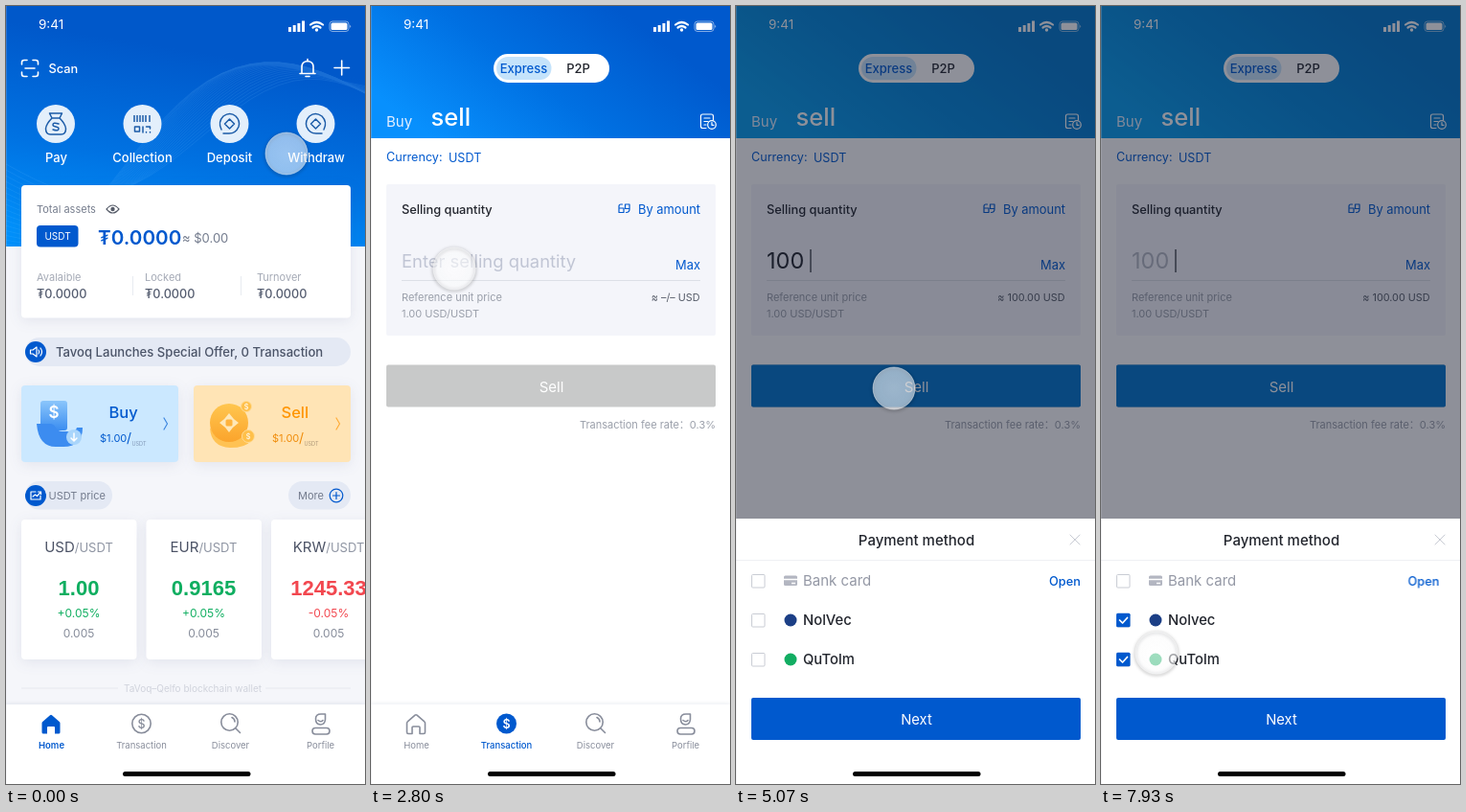
These frames come from a looping animation (375 px wide and 812 px high, 8 s). An HTML page:

```html
<!DOCTYPE html>
<html lang="en">
<head>
<meta charset="utf-8">
<title>Wallet sell flow</title>
<style>
html, body { margin: 0; width: 100%; height: 100%; overflow: hidden; background: #fff; }
svg { display: block; width: 100%; height: 100%; }
text { font-family: Inter, "Noto Sans", "Noto Sans CJK SC", "Noto Sans CJK", sans-serif; white-space: pre; }
.num { font-family: "Liberation Sans", Arial, sans-serif; font-weight: 700; font-size: 22px; }
.mid { text-anchor: middle; }
.end { text-anchor: end; }
.med { font-weight: 500; }
.line { fill: none; stroke-linecap: round; stroke-linejoin: round; }
.card { fill: #fff; filter: drop-shadow(0 3px 7px rgba(40, 60, 110, .09)); }
.anim { animation: 8s linear infinite; }

#sellScreen { animation-name: openSell; }
#placeholder { animation-name: dropHint; }
#caret { animation-name: showCaret; }
#amount, #activeButton, #total { animation-name: enterAmount; }
#emptyTotal { animation-name: clearTotal; }
#amount text { animation-name: mute; }
.tint { fill: #00b8c8; animation-name: tint; }
#dim { animation-name: dim; }
#deepDim { animation-name: deepen; }
#p2p { animation-name: nudge; }
#sheet { animation-name: rise; }
.checkA { animation-name: checkA; }
.uncheckA { animation-name: uncheckA; }
.checkB { animation-name: checkB; }
#open { animation-name: shiftOpen; }
#cursor { animation-name: travel; animation-timing-function: ease-in-out; }

@keyframes openSell { 0%, 17% { opacity: 0; } 20%, 100% { opacity: 1; } }
@keyframes dropHint { 0%, 37.5% { opacity: 1; } 39.5%, 100% { opacity: 0; } }
@keyframes showCaret { 0%, 37.5% { opacity: 0; transform: translateX(-44px); }
  39.5%, 45% { opacity: 1; transform: translateX(-44px); }
  48%, 100% { opacity: 1; transform: none; } }
@keyframes enterAmount { 0%, 45% { opacity: 0; } 48%, 100% { opacity: 1; } }
@keyframes clearTotal { 0%, 45% { opacity: 1; } 48%, 100% { opacity: 0; } }
@keyframes mute { 0%, 65% { fill: #23262e; } 68%, 100% { fill: #b4b8c2; } }
@keyframes tint { 0%, 57.5% { opacity: 0; } 61.5%, 100% { opacity: .3; } }
@keyframes dim { 0%, 57.5% { opacity: 0; } 61.5%, 100% { opacity: .48; } }
@keyframes deepen { 0%, 80% { opacity: 0; } 82%, 84% { opacity: .25; } 86.5%, 100% { opacity: 0; } }
@keyframes nudge { 0%, 80% { transform: none; } 82%, 84% { transform: translateX(-3px); } 86.5%, 100% { transform: none; } }
@keyframes rise { 0%, 57.5% { transform: translateY(278px); animation-timing-function: ease-out; } 61.5%, 100% { transform: none; } }
@keyframes checkA { 0%, 84% { opacity: 0; } 86.5%, 100% { opacity: 1; } }
@keyframes uncheckA { 0%, 84% { opacity: 1; } 86.5%, 100% { opacity: 0; } }
@keyframes checkB { 0%, 94% { opacity: 0; } 96%, 100% { opacity: 1; } }
@keyframes shiftOpen { 0%, 84% { transform: none; } 86.5%, 100% { transform: translateX(-6.5px); } }
@keyframes travel {
  0% { transform: translate(293px, 154px); }
  11%, 20% { transform: translate(264px, 436px); }
  31%, 34% { transform: translate(86px, 274px); }
  35%, 52.5% { transform: translate(87px, 274px); }
  57%, 65.5% { transform: translate(165px, 399px); }
  77%, 87.5% { transform: translate(35px, 642px); }
  92%, 100% { transform: translate(58px, 675px); }
}
</style>
</head>
<body>
<svg viewBox="0 0 375 812" preserveAspectRatio="none">
<defs>
  <linearGradient id="homeBlue" x1=".62" y1="0" x2=".38" y2="1">
    <stop offset=".2" stop-color="#0058ca"/><stop offset=".65" stop-color="#0072e2"/><stop offset="1" stop-color="#0090fa"/>
  </linearGradient>
  <linearGradient id="sellBlue" x1="0" y1=".65" x2=".8" y2=".25">
    <stop offset="0" stop-color="#0890fd"/><stop offset=".5" stop-color="#0070e2"/><stop offset="1" stop-color="#0059cd"/>
  </linearGradient>
  <linearGradient id="azure" x1="0" y1="0" x2="0" y2="1"><stop stop-color="#8bc6fb"/><stop offset="1" stop-color="#3b8df0"/></linearGradient>
  <linearGradient id="amber" x1="0" y1="0" x2="0" y2="1"><stop stop-color="#ffc64f"/><stop offset="1" stop-color="#fba42c"/></linearGradient>
  <radialGradient id="glass"><stop stop-color="#fff" stop-opacity=".6"/><stop offset=".8" stop-color="#fbfbfb" stop-opacity=".58"/><stop offset="1" stop-color="#eff0f2" stop-opacity=".6"/></radialGradient>
  <clipPath id="homeClip"><rect width="375" height="251"/></clipPath>

  <g id="status" fill="#fff">
    <text x="34" y="24" font-size="13.5">9:41</text>
    <path d="M295 22h3v5h-3zM299.7 20h3v7h-3zM304.4 18h3v9h-3zM309 15.500h3V27h-3z"/>
    <g class="line" stroke="#fff" stroke-width="2.200"><path d="M318 19.500q6.500-5 13 0M320.500 22.500q4-3 8 0"/></g>
    <circle cx="324.500" cy="25" r="1.700"/>
    <rect x="338" y="16" width="20" height="10.500" rx="3" fill="none" stroke="#fff" stroke-opacity=".5"/>
    <rect x="339.500" y="17.500" width="17" height="7.500" rx="1.500"/><path d="M359.500 19.500v3.500q1.500-1.700 0-3.500"/>
  </g>
  <g id="tabs">
    <rect y="729" width="375" height="83" fill="#fff" style="filter:drop-shadow(0 -1px 2px rgba(60,80,130,.1))"/>
    <g class="line" stroke="#888d9b" stroke-width="1.600">
      <circle cx="233.500" cy="747.500" r="8.700"/><path d="M240 754l4.500 4.500M236 742.500q3 1.500 3 4.500"/>
      <path d="M323.500 744q0-5 5.500-5h4.500v5.500q-.500 5.500-5 5.500-5 0-5-6zM326 745.500q3 2.500 5 0"/><rect x="320" y="753.500" width="18" height="6.500" rx="3.200"/>
    </g>
    <g class="mid" font-size="9.500" fill="#888d9b"><text x="234.500" y="775">Discover</text><text x="328.500" y="775">Porfile</text></g>
  </g>
  <rect id="bar" x="122" y="799" width="133.500" height="5" rx="2.500" fill="#000"/>
  <path id="house" d="M37.500 748.500q0-1 1-1.800l7.500-6.500q1-.800 2 0l7.500 6.500q1 .800 1 1.800V758q0 1.500-1.500 1.500H51V753q0-1-1-1h-6q-1 0-1 1v6.500h-4q-1.500 0-1.500-1.500z"/>
  <g id="tick"><rect x="16" y="-7.300" width="14.500" height="14.500" rx="1.500" fill="#0059ce"/><path class="line" d="M19.500 0l3 3 5-5.500" stroke="#fff" stroke-width="1.700"/></g>
  <rect id="box" x="16.500" y="-6.500" width="13.500" height="13.500" rx="1" fill="#fff" stroke="#c9ccd4"/>
</defs>

<!-- Home -->
<g>
  <rect width="375" height="812" fill="#f5f6fa"/>
  <rect width="375" height="251" fill="url(#homeBlue)"/>
  <g id="waves" clip-path="url(#homeClip)" fill="none" stroke="#7cc4ff" stroke-width=".6" opacity=".2"/>
  <use href="#status"/>
  <g class="line" stroke="#fff" stroke-width="1.600">
    <path d="M16.500 61v-2q0-2.500 2.500-2.500h3M28 56.500h3q2.500 0 2.500 2.500v2M33.500 69v2q0 2.500-2.500 2.500h-3M22 73.500h-3q-2.500 0-2.500-2.500v-2M20 65h10"/>
    <path d="M307 70.500h16M309 70v-6.500q0-5.500 6-6 6 .500 6 6V70M313 73.500h4M315 55.500v1.500M343 64.500h15.500M350.700 57v15"/>
  </g>
  <text class="med" x="44.500" y="70" font-size="12.800" fill="#fff">Scan</text>
  <g fill="#e3effb"><circle cx="52" cy="123" r="20"/><circle cx="142.500" cy="123" r="20"/><circle cx="233.500" cy="123" r="20"/><circle cx="323.500" cy="123" r="20"/></g>
  <g class="line" stroke="#1c5ca8" stroke-width="1.500">
    <path d="M48 117l-2.500-5h13l-2.500 5M48 117h8q6 6 6.500 11 0 6-5 6h-11q-5 0-5-6 .500-5 6.500-11M55 123q-6-2-6 1 0 1.500 3 2t3 2q0 3-6 1"/>
    <path d="M134 114v7M137 114v7M140 114v7M143 114v7M146 114v7M150 114v7" stroke-linecap="butt"/>
    <path d="M134.500 126h5v5h-5zM143 126v6M146.500 126h4v2M150.500 131.500v.500M146.500 131.500v.500"/>
    <g id="swap"><path d="M233.500 118l5 5-5 5-5-5zM225 129q-4-8 2-14 7-5 13 0 5 5 3 11-3 7-10 7h-6"/></g>
    <use href="#swap" transform="matrix(-1 0 0 1 557 0)"/>
  </g>
  <g class="mid med" font-size="13" fill="#fff"><text x="52.500" y="163">Pay</text><text x="142.500" y="163">Collection</text><text x="233.500" y="163">Deposit</text><text x="324" y="163">Withdraw</text></g>

  <rect class="card" x="16" y="187" width="344" height="138.500" rx="4"/>
  <text x="32" y="215.500" font-size="11" fill="#777e8e">Total assets</text>
  <path class="line" d="M105 212q6.500-8 13 0-6.500 8-13 0z" stroke="#555b68" stroke-width="1.200"/><circle cx="111.500" cy="212" r="2.200" fill="#555b68"/>
  <rect x="32" y="229" width="43.500" height="22.500" rx="4" fill="#0059ce"/>
  <text class="mid" x="54" y="244" font-size="10" fill="#fff">USDT</text>
  <text x="96" y="248.500" font-size="20.700" font-weight="600" fill="#0059ce">₮0.0000</text>
  <text x="184" y="247" font-size="13" fill="#737b8d">≈ $0.00</text>
  <g font-size="11" fill="#a5aab6"><text x="32" y="287">Avalaible</text><text x="145" y="287">Locked</text><text x="262" y="287">Turnover</text></g>
  <g class="med" font-size="12.700" fill="#555d70"><text x="32" y="305">₮0.0000</text><text x="145" y="305">₮0.0000</text><text x="262" y="305">₮0.0000</text></g>
  <path d="M132.500 282v20M245.500 282v20" stroke="#e8ebf1"/>

  <rect x="20" y="346" width="340" height="30" rx="15" fill="#e4e9f4"/>
  <circle cx="31" cy="361" r="11" fill="#0059ce"/>
  <path class="line" d="M25.500 359h2.500l4-3v10l-4-3h-2.500zM34 359q1.500 2 0 4M36 357q3 4 0 8" stroke="#fff" stroke-width="1.200"/>
  <text class="med" x="52" y="366" font-size="13.100" fill="#4b5468">Tavoq Launches Special Offer, 0 Transaction</text>

  <rect class="card" x="16" y="396" width="164" height="80" rx="4" style="fill:#cbe8ff"/>
  <rect class="card" x="196" y="396" width="164" height="80" rx="4" style="fill:#ffe4b5"/>
  <rect x="36" y="412" width="28" height="31" rx="3" fill="url(#azure)"/>
  <path d="M32 436h14q4 0 6 4t7 4h9q5 0 6-4h6q0 20-20 20h-8q-18 0-20-24z" fill="#3c8cf0"/>
  <circle cx="71" cy="450" r="8" fill="#a9d5fb"/><path class="line" d="M71 446v7M68 451l3 3 3-3" stroke="#fff" stroke-width="1.500"/>
  <text class="mid" x="50" y="430" font-size="17" font-weight="600" fill="#fff">$</text>
  <path d="M213 440q6 10 18 10h27q-4 11-24 11-20-1-21-21z" fill="#ffc253"/>
  <circle cx="233" cy="435" r="20" fill="url(#amber)"/>
  <path d="M233 425q4 6 10 10-6 4-10 10-4-6-10-10 6-4 10-10z" fill="#ffe8b8"/><rect x="229.500" y="431.500" width="7" height="7" rx="1.500" fill="#ffb33c"/>
  <g fill="#ffc04a" stroke="#ffdc96"><circle cx="251" cy="418" r="5.500"/><circle cx="253" cy="449" r="6.500"/></g>
  <g class="mid" font-size="8" fill="#fff"><text x="251" y="421">$</text><text x="253" y="452">$</text></g>
  <g class="med" font-size="16.500"><text x="107.500" y="430" fill="#0059ce">Buy</text><text x="287.500" y="430" fill="#ff9500">Sell</text></g>
  <g font-size="11" fill="#0059ce"><text x="98" y="455">$1.00</text><text x="126" y="456" font-size="14">/</text><text x="131.500" y="459" font-size="5.500" fill="#7f95b5">USDT</text></g>
  <g font-size="11" fill="#f08c0a"><text x="278" y="455">$1.00</text><text x="306" y="456" font-size="14">/</text><text x="311.500" y="459" font-size="5.500" fill="#ab9678">USDT</text></g>
  <path class="line" d="M165 430l3.500 6-3.500 6" stroke="#3d86df" stroke-width="1.200"/><path class="line" d="M345 430l3.500 6-3.500 6" stroke="#ffac38" stroke-width="1.200"/>

  <rect x="20" y="496" width="91" height="29.500" rx="14.700" fill="#e4e9f4"/><rect x="295" y="496" width="65" height="29.500" rx="14.700" fill="#e4e9f4"/>
  <circle cx="31" cy="511" r="11" fill="#0059ce"/>
  <path class="line" d="M31 507h-5v8h10v-4M28 512l2.500-2 2 1.500 4-4.500h-3M36.500 507v2.500" stroke="#fff" stroke-width="1.200"/>
  <g font-size="11" fill="#737b8d"><text x="44.500" y="515">USDT price</text><text x="305" y="515">More</text></g>
  <g class="line" stroke="#0059ce" stroke-width="1.200"><circle cx="345" cy="511" r="6.800"/><path d="M341.500 511h7M345 507.500v7"/></g>

  <g id="prices"></g>
  <path d="M16 712h101M271 712h89" stroke="#e7e9ef"/>
  <text class="mid" x="195" y="716" font-size="10" fill="#d0d3dc">TaVoq–Qelfo blockchain wallet</text>
  <use href="#tabs"/>
  <use href="#house" fill="#0059ce"/>
  <g class="line" stroke="#888d9b" stroke-width="1.600"><circle cx="141.500" cy="749" r="9.700"/></g>
  <g class="mid" font-size="9.500"><text class="med" x="141.500" y="753.500" font-size="12.500" fill="#888d9b">$</text>
    <text x="47.500" y="775" font-weight="600" fill="#0059ce">Home</text><text x="141.500" y="775" fill="#888d9b">Transaction</text></g>
  <use href="#bar"/>
</g>

<!-- Sell -->
<g id="sellScreen" class="anim">
  <rect width="375" height="812" fill="#fff"/>
  <rect width="375" height="138" fill="url(#sellBlue)"/>
  <rect class="anim tint" width="375" height="138"/>
  <use href="#status"/>
  <rect x="128" y="50" width="121" height="30" rx="15" fill="#fff"/><rect x="131" y="53" width="57.500" height="24" rx="12" fill="#c4e3fb"/>
  <g class="mid med" font-size="13"><text x="159.500" y="70" fill="#0059ce">Express</text><text id="p2p" class="anim" x="216.500" y="70" fill="#23262e">P2P</text></g>
  <text x="16" y="126" font-size="15" fill="#e4efff">Buy</text><text class="med" x="62.500" y="125" font-size="25.500" fill="#fff">sell</text>
  <g class="line" stroke="#fff" stroke-width="1.200"><path d="M350 127.500h-3.500q-2 0-2-2V115q0-2 2-2h9q2 0 2 2v4M348 117h6M348 120.500h4M348 124h2"/><circle cx="356" cy="124" r="4.300"/><path d="M356 121.500v2.800h2"/></g>
  <g font-size="12.600" fill="#0059ce"><text x="16" y="162">Currency:</text><text x="81" y="163">USDT</text></g>
  <rect x="16" y="186" width="344" height="158" rx="2" fill="#f4f5fa"/>
  <text class="med" x="32" y="216.500" font-size="12.800" fill="#23262e">Selling quantity</text>
  <path class="line" d="M262.500 207h-1.500q-2 0-2 2v6.500h5v-4.500h-5M270 211.500h-4.500V207h4.500v5q0 3.500-3.500 3.500" stroke="#0059ce" stroke-width="1.200"/>
  <g class="end" font-size="12.900" fill="#0059ce"><text x="344" y="216.500">By amount</text><text x="344" y="274.500">Max</text></g>
  <text id="placeholder" class="anim" x="32" y="273" font-size="18.400" fill="#c0c5d4">Enter selling quantity</text>
  <g id="amount" class="anim"><text class="anim" x="32" y="273.500" font-size="23.500">100</text></g>
  <path id="caret" class="anim" d="M78 254v24" stroke="#23262e" stroke-width="1.200"/>
  <path d="M32 286.500h312" stroke="#dcdfe6"/>
  <g font-size="11" fill="#9a9faa"><text x="32" y="308">Reference unit price</text><text x="32" y="324.500">1.00 USD/USDT</text>
    <text class="end" x="360" y="440.500">Transaction fee rate：0.3%</text></g>
  <g class="end" font-size="10.800" fill="#565c68"><text id="emptyTotal" class="anim" x="343.500" y="308">≈ –/– USD</text><text id="total" class="anim" x="343.500" y="308">≈ 100.00 USD</text></g>
  <rect x="16" y="374.500" width="344" height="44" rx="2" fill="#c8c9c9"/>
  <rect id="activeButton" class="anim" x="16" y="374.500" width="344" height="44" rx="2" fill="#0059ce"/>
  <rect class="anim tint" x="16" y="374.500" width="344" height="44" rx="2"/>
  <text class="mid" x="188.500" y="402.500" font-size="15" fill="#fff">Sell</text>
  <use href="#tabs"/>
  <use href="#house" class="line" stroke="#888d9b" stroke-width="1.600"/>
  <circle cx="141.500" cy="749" r="10.500" fill="#0059ce"/>
  <g class="mid" font-size="9.500"><text x="141.500" y="753.500" font-size="12.500" font-weight="600" fill="#fff">$</text>
    <text x="47.500" y="775" fill="#888d9b">Home</text><text class="med" x="141.500" y="775" fill="#0059ce">Transaction</text></g>
  <use href="#bar"/>
</g>
<rect id="dim" class="anim" width="375" height="812" fill="#14182a"/>
<rect id="deepDim" class="anim" width="375" height="812" fill="#3a4a55"/>

<!-- Payment sheet -->
<g id="sheet" class="anim">
  <rect y="535" width="375" height="277" fill="#fff"/>
  <text class="mid med" x="188.500" y="563" font-size="15" fill="#23262e">Payment method</text>
  <path class="line" d="M349 552l10 10M359 552l-10 10" stroke="#c9ccd4"/>
  <path d="M0 578.500h375" stroke="#eff0f4"/>
  <use href="#box" y="600"/><use href="#box" y="641"/><use href="#box" y="682"/>
  <use href="#tick" class="anim checkA" y="641"/><use href="#tick" class="anim checkB" y="682"/>
  <rect x="50" y="594.500" width="14" height="10.500" rx="1.500" fill="#b3b6c1"/><path d="M50 598.500h14M58 602.500h4" stroke="#fff" stroke-width="1.300"/>
  <circle cx="57" cy="641" r="6.500" fill="#1c3f86"/><circle cx="57" cy="682" r="6.500" fill="#12ad62"/>
  <g font-size="15"><text x="70" y="605" fill="#9498a5">Bank card</text>
    <g class="med" font-size="14.800" fill="#23262e"><text class="anim uncheckA" x="70" y="646">NolVec</text><text class="anim checkA" x="70" y="646">Nolvec</text><text x="70" y="687">QuTolm</text></g></g>
  <text id="open" class="anim end med" x="360" y="605" font-size="12.800" fill="#0059ce">Open</text>
  <rect x="16" y="722" width="344" height="44" rx="2" fill="#0059ce"/>
  <text class="mid" x="188.500" y="749.500" font-size="14.800" fill="#fff">Next</text>
  <use href="#bar"/>
</g>

<rect width="1" height="812" fill="#d9dde4" opacity=".2"/>
<g id="cursor" class="anim"><circle r="22" fill="none" stroke="#000" stroke-opacity=".18" stroke-width="3" cy="1" style="filter:blur(1.500px)"/><circle r="22" fill="url(#glass)" stroke="#fff" stroke-opacity=".45"/></g>
</svg>
<script>
const quotes = [
  ['USD', '1.00', '+0.05%', 16], ['EUR', '0.9165', '+0.05%', 146.5], ['KRW', '1245.33', '-0.05%', 277]
];
document.getElementById('prices').innerHTML = quotes.map(([unit, price, change, x]) => {
  const mid = x + 60;
  const color = change[0] === '+' ? '#0fae60' : '#f2474f';
  return `<rect class="card" x="${x}" y="536" width="120.5" height="146" rx="4"/>
    <g class="mid"><text x="${mid}" y="570" font-size="15" fill="#4b5265">${unit}<tspan font-size="13" fill="#8f95a3">/USDT</tspan></text>
    <text class="num" x="${mid}" y="615" fill="${color}">${price}</text>
    <text x="${mid}" y="638" font-size="12" fill="${color}">${change}</text>
    <text x="${mid}" y="659" font-size="12" fill="#858b99">0.005</text></g>`;
}).join('');

const wave = i => {
  let d = '';
  for (let x = 0; x <= 375; x += 15) {
    const y = 165 + 45 * Math.sin(x / 65 + i * .07) - x * .14 + i * 3 * Math.cos(x / 120);
    d += `${x ? 'L' : 'M'}${x} ${y.toFixed(1)}`;
  }
  return `<path d="${d}"/>`;
};
document.getElementById('waves').innerHTML = Array.from({ length: 24 }, (_, i) => wave(i)).join('');
</script>
</body>
</html>
```
